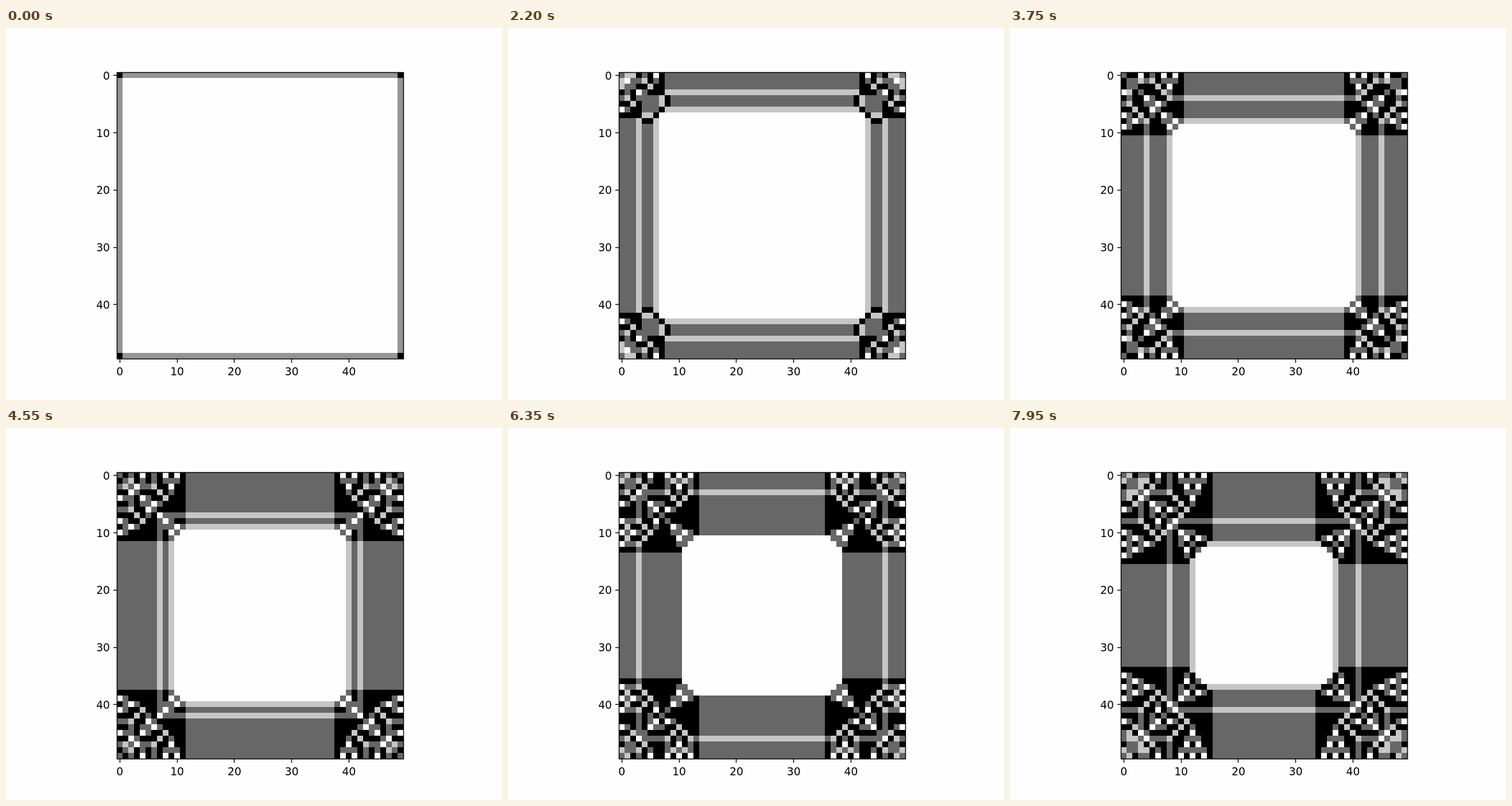
An HTML page with a canvas for the animation above (8000 ms loop, 864 by 648 pixels).

```html
<!DOCTYPE html>
<html lang="en">
<head>
<meta charset="utf-8">
<title>Sandpile</title>
<style>
  html, body { margin: 0; width: 100%; height: 100%; overflow: hidden; background: #fefefe; }
  canvas, svg { position: absolute; left: 0; top: 0; width: 100%; height: 100%; display: block; }
  text { font: 18.75px "DejaVu Sans", sans-serif; fill: #000; }
</style>
</head>
<body>
<canvas id="plot" width="864" height="648"></canvas>
<svg id="labels" viewBox="0 0 864 648"></svg>
<script>
const N = 50, STEPS = 160, STEP_MS = 50;
const LEFT = 193, TOP = 77, SIZE = 499;
const RIGHT = LEFT + SIZE, BOTTOM = TOP + SIZE;
const WHITE = '#fefefe', LIGHT = '#c6c6c6', MID = '#959595', DARK = '#676767', BLACK = '#000';
const PALETTES = { 2: [WHITE, MID, BLACK], 3: [WHITE, LIGHT, DARK, BLACK] };

const ctx = document.getElementById('plot').getContext('2d');
const labels = document.getElementById('labels');
const tickX = value => 193.32 + 9.979 * (value + 0.5);
const tickY = value => 77.76 + 9.979 * (value + 0.5);
const pixelCentre = v => Math.floor(v) + 0.5;

// Topple every cell holding four or more grains until the pile is stable.
function stabilise(grid) {
  const stack = [];
  grid.forEach((v, i) => { if (v > 3) stack.push(i); });
  const give = (i, grains) => {
    grid[i] += grains;
    if (grid[i] > 3) stack.push(i);
  };
  while (stack.length) {
    const i = stack.pop(), grains = grid[i] >> 2;
    if (!grains) continue;
    grid[i] &= 3;
    const x = i % N;
    if (x > 0) give(i - 1, grains);
    if (x < N - 1) give(i + 1, grains);
    if (i >= N) give(i - N, grains);
    if (i < N * (N - 1)) give(i + N, grains);
  }
}

// Each step drops one grain along every side, so corners receive two.
function buildPiles() {
  const grid = new Uint8Array(N * N), piles = [];
  for (let s = 0; s < STEPS; s++) {
    for (let k = 0; k < N; k++) {
      grid[k]++;
      grid[N * (N - 1) + k]++;
      grid[N * k]++;
      grid[N * k + N - 1]++;
    }
    stabilise(grid);
    piles.push(grid.slice());
  }
  return piles;
}

function line(x1, y1, x2, y2) {
  ctx.beginPath();
  ctx.moveTo(x1, y1);
  ctx.lineTo(x2, y2);
  ctx.stroke();
}

function drawAxes() {
  ctx.strokeStyle = BLACK;
  ctx.lineWidth = 1.5;
  for (let v = 0; v < N; v += 10) {
    const x = pixelCentre(tickX(v)), y = pixelCentre(tickY(v));
    line(x, BOTTOM + 0.5, x, BOTTOM + 7);
    line(LEFT + 0.5, y, LEFT - 6, y);
  }
  ctx.strokeRect(LEFT + 0.5, TOP + 0.5, SIZE, SIZE);
}

function addLabel(text, x, y, anchor) {
  const el = document.createElementNS('http://www.w3.org/2000/svg', 'text');
  el.setAttribute('x', x);
  el.setAttribute('y', y);
  el.setAttribute('text-anchor', anchor);
  el.textContent = text;
  labels.append(el);
}

function drawPile(pile) {
  const colours = PALETTES[Math.max(...pile)];
  const edge = k => Math.round(k * SIZE / N);
  ctx.fillStyle = WHITE;
  ctx.fillRect(0, 0, 864, 648);
  pile.forEach((v, i) => {
    if (!v) return;
    const col = i % N, row = (i - col) / N;
    const x = edge(col), y = edge(row);
    ctx.fillStyle = colours[v];
    ctx.fillRect(LEFT + x, TOP + y, edge(col + 1) - x, edge(row + 1) - y);
  });
  drawAxes();
}

for (let v = 0; v < N; v += 10) {
  addLabel(v, tickX(v), 605, 'middle');
  addLabel(v, 181, Math.round(tickY(v) + 7), 'end');
}

const piles = buildPiles();
let shown = -1;
function render() {
  const step = Math.floor(performance.now() / STEP_MS) % STEPS;
  if (step !== shown) {
    drawPile(piles[step]);
    shown = step;
  }
  requestAnimationFrame(render);
}
render();
</script>
</body>
</html>
```
